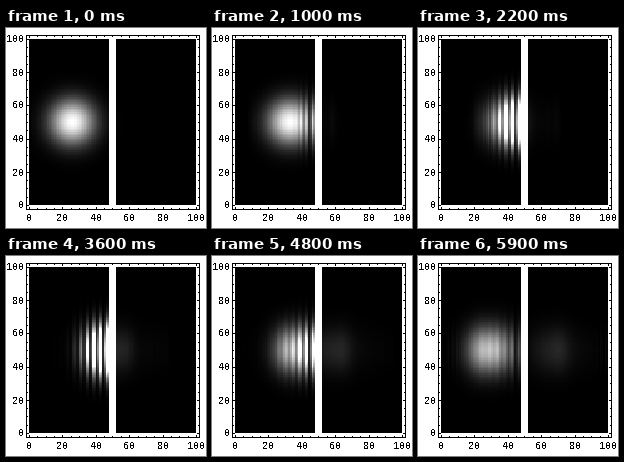
Write a matplotlib script that moves like this. It is 200 by 200 pixels and loops after 6 s.

```python
import numpy as np
import matplotlib.pyplot as plt
from matplotlib.animation import FuncAnimation
from matplotlib.patches import Rectangle

# Wave packet meeting a thin, tall potential barrier, on a unit lattice
N, FRAMES = 100, 60
X0, Y0, SIGMA, K = 26, 50, 9.2, 0.8
WALL, BARRIER, HEIGHT = slice(48, 52), 48, 1.65

LEFT, RIGHT, TOP, BOTTOM = 23, 190, 11, 177
cells = np.arange(N) + 0.5

potential = np.zeros(N)
potential[BARRIER] = HEIGHT
hop = np.full(N - 1, -0.5)
energy, modes = np.linalg.eigh(
    np.diag(1 + potential) + np.diag(hop, 1) + np.diag(hop, -1))
packet = np.exp(-((cells - X0) / (2 * SIGMA)) ** 2 + 1j * K * cells)
weights = modes.T @ packet


def density(t):
    """Probability density: barrier scattering in x, free spreading in y."""
    px = np.abs(modes @ (weights * np.exp(-1j * energy * t))) ** 2
    spread = np.hypot(1, t / (2 * SIGMA ** 2))
    py = np.exp(-((cells - Y0) / (SIGMA * spread)) ** 2 / 2) / spread
    grid = np.outer(py, px)
    grid[:, WALL] = 1
    return np.clip(grid, 0, 1)


plt.rcParams["text.antialiased"] = False
fig = plt.figure(figsize=(2, 2), dpi=100, facecolor="white")
ax = fig.add_axes([0, 0, 1, 1])
image = ax.imshow(density(0), cmap="gray", vmin=0, vmax=1, aspect="auto",
                  interpolation="nearest", extent=(LEFT, RIGHT, BOTTOM, TOP))
ax.set(xlim=(0, 200), ylim=(200, 0))
ax.axis("off")


def bar(x, y, w, h):
    ax.add_patch(Rectangle((x, y), w, h, color="black", lw=0, antialiased=False))


def label(x, y, value, align):
    ax.text(x, y, str(value), ha=align, va="center_baseline", color="black",
            family="Liberation Mono", size=7.2)


# Frame with ticks on all four sides
x1, x2, y1, y2 = 20, 193, 7, 181
for y in (y1, y2):
    bar(x1, y, x2 - x1 + 1, 1)
for x in (x1, x2):
    bar(x, y1, 1, y2 - y1 + 1)

for v in range(0, 101, 5):
    size = 1 if v % 20 else 2
    tx = round(LEFT + (RIGHT - LEFT) * v / 100)
    ty = round(BOTTOM - (BOTTOM - TOP) * v / 100)
    bar(tx, y1 + 1, 1, size)
    bar(tx, y2 - size, 1, size)
    bar(x1 + 1, ty, size, 1)
    bar(x2 - size, ty, size, 1)
    if v % 20 == 0:
        label(tx + 0.5, 189, v, "center")
        label(18.5, ty - 0.5, v, "right")


def update(frame):
    image.set_data(density(frame))
    return (image,)


anim = FuncAnimation(fig, update, frames=FRAMES, interval=100, repeat=True,
                     repeat_delay=0, blit=False)
plt.show()
```
